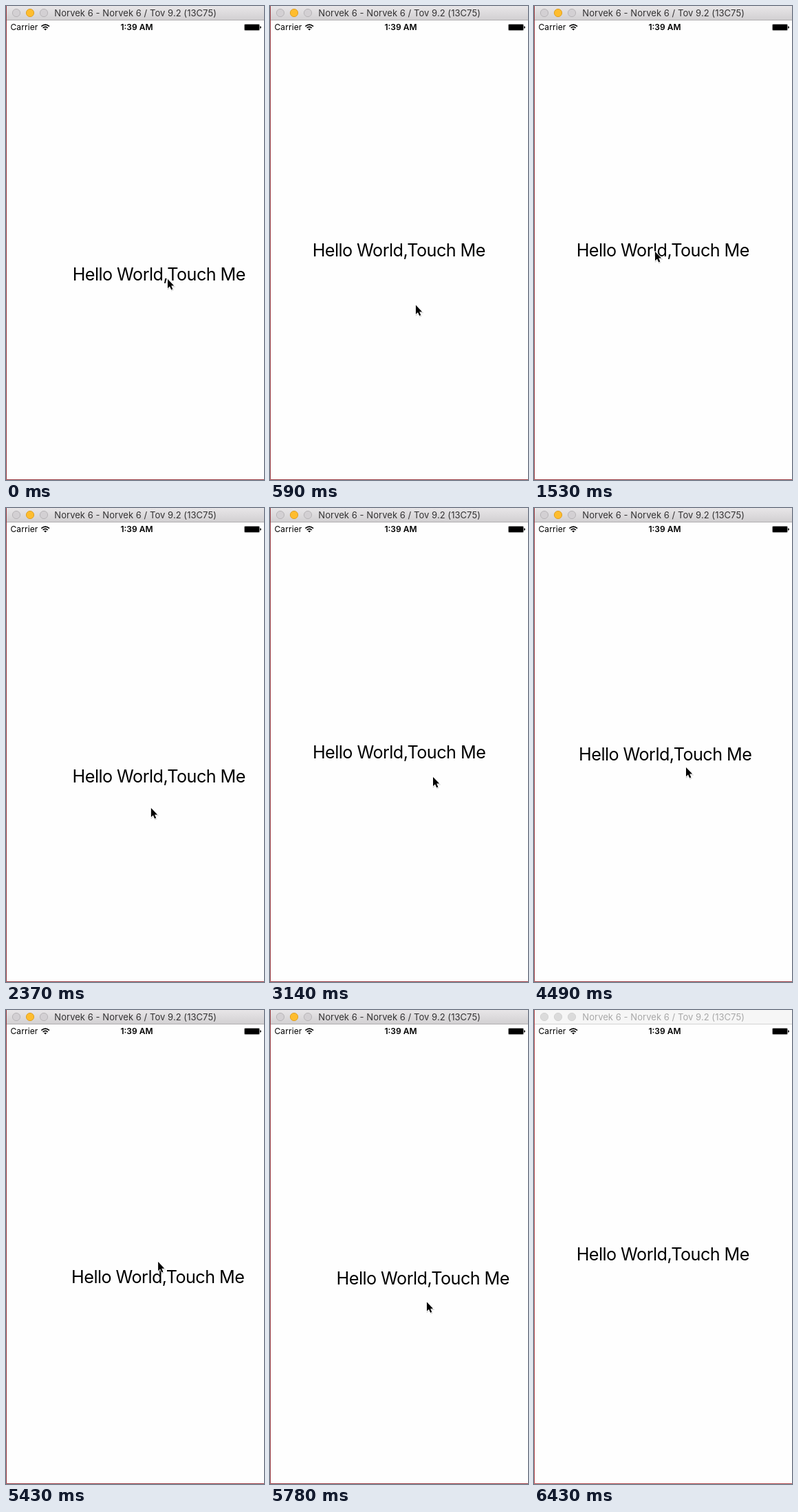
An HTML page for the animation above (6.49 s loop, 375 by 689 pixels).

```html
<!DOCTYPE html>
<html lang="en">
<head>
<meta charset="utf-8">
<title>Touch label</title>
<style>
  html, body { margin: 0; width: 100%; height: 100%; overflow: hidden; background: #fefefe; }
  svg { display: block; width: 100%; height: 100%; }
  text { font-family: Inter, Roboto, "Liberation Sans", sans-serif; white-space: pre; }
</style>
</head>
<body>
<svg viewBox="0 0 375 689" preserveAspectRatio="xMinYMin meet">
  <defs>
    <linearGradient id="chrome" x2="0" y2="1">
      <stop offset="0" stop-color="#e8e6e8"/>
      <stop offset="1" stop-color="#d2d0d2"/>
    </linearGradient>
    <path id="arrow" d="M0 0V13.2L3 10.4L5.2 15.4L7.3 14.5L5.2 9.6H9.2Z"/>
  </defs>
  <rect width="375" height="689" fill="#fefefe"/>

  <rect id="bar" x="1" width="374" height="20"/>
  <rect id="barLine" x="1" y="20" width="374" height="1"/>
  <g id="lights">
    <circle cx="15" cy="10" r="5.6"/>
    <circle cx="35" cy="10" r="5.6"/>
    <circle cx="55" cy="10" r="5.6"/>
  </g>
  <text id="title" x="70.3" y="15" font-size="13" letter-spacing=".05">Norvek 6 - Norvek 6 / Tov 9.2 (13C75)</text>

  <text x="6.5" y="35.3" font-size="12" letter-spacing=".1">Carrier</text>
  <g fill="none" stroke="#000" stroke-width="1.6">
    <path d="M51.4 29.6Q57.2 24.6 63 29.6M53.6 32Q57.2 28.9 60.8 32"/>
    <path d="M57.2 35.6L55.2 33.5Q57.2 31.9 59.2 33.5Z" fill="#000" stroke="none"/>
  </g>
  <text x="190" y="35.3" font-size="12" font-weight="600" text-anchor="middle">1:39 AM</text>
  <rect x="346.5" y="26.5" width="22" height="9" rx="1" fill="#fefefe" stroke="#999"/>
  <rect x="347" y="27" width="21" height="8" fill="#000"/>
  <path d="M369.2 29.2Q371 29.4 371 31T369.2 32.8Z" fill="#000"/>

  <text id="label" x="187.3" y="364" font-size="25.2" letter-spacing="-.55" text-anchor="middle">Hello World,Touch Me</text>

  <path id="edge" d="M.5 0V688.5H375" fill="none"/>

  <g id="cursor">
    <use href="#arrow" x=".5" y="1.2" opacity=".18" stroke="#000" stroke-width="1.4"/>
    <use href="#arrow" stroke="#fff" stroke-width="1.8" stroke-linejoin="round"/>
    <use href="#arrow"/>
  </g>
</svg>
<script>
const LOOP = 6490;
const SHIFT = 35;
const STIFFNESS = 0.0217;
const EXIT_AT = 6260;
const BLUR_AT = 6430;

// Each tap toggles the label between its home and the shifted place.
const taps = [30, 1745, 2830, 3495, 4311, 5205, 5870];

// Pointer glides: start, end, x, y; it rests in between.
const home = [235, 397];
const glides = [
  [60, 700, 210, 438],
  [700, 1530, 176, 357],
  [1770, 2200, 208, 441],
  [2200, 3080, 237, 391],
  [3140, 3460, 229, 362],
  [3460, 3790, 226, 383],
  [3790, 4460, 221, 377],
  [4490, 4720, 221, 365],
  [5400, 5800, 228, 425],
  [5870, EXIT_AT, 238, 695]
];

const $ = id => document.getElementById(id);
const set = (el, attrs) => {
  for (const key in attrs) el.setAttribute(key, attrs[key]);
};
const smooth = k => k * k * (3 - 2 * k);
const clamp = k => Math.min(1, Math.max(0, k));

// Critically damped spring after the latest tap
function labelShift(t) {
  const count = taps.filter(tap => tap <= t).length;
  if (!count) return SHIFT;
  const a = (t - taps[count - 1]) * STIFFNESS;
  const left = (1 + a) * Math.exp(-a);
  return SHIFT * (count % 2 ? left : 1 - left);
}

function pointer(t) {
  return glides.reduce(([px, py], [from, to, x, y]) => {
    const k = smooth(clamp((t - from) / (to - from)));
    return [px + (x - px) * k, py + (y - py) * k];
  }, home);
}

function drawWindow(active) {
  set($("bar"), { fill: active ? "url(#chrome)" : "#f6f6f6" });
  set($("barLine"), { fill: active ? "#b1afb1" : "#d4d4d4" });
  set($("title"), { fill: active ? "#333233" : "#a8a8a8" });
  set($("edge"), { stroke: active ? "#983a40" : "#b0484c" });
  [...$("lights").children].forEach((light, i) => {
    const lit = active && i === 1;
    set(light, {
      fill: lit ? "#ffbd2e" : active ? "#d3d0d3" : "#dbdbdb",
      stroke: lit ? "#dfa023" : active ? "#b8b5b8" : "#d2d2d2"
    });
  });
}

function draw(t) {
  const shift = labelShift(t);
  set($("label"), { transform: `translate(${shift} ${shift})` });
  set($("cursor"), {
    transform: `translate(${pointer(t)})`,
    visibility: t < EXIT_AT ? "visible" : "hidden"
  });
  drawWindow(t < BLUR_AT);
}

const start = performance.now();
function tick() {
  draw((performance.now() - start) % LOOP);
  requestAnimationFrame(tick);
}
tick();
</script>
</body>
</html>
```
